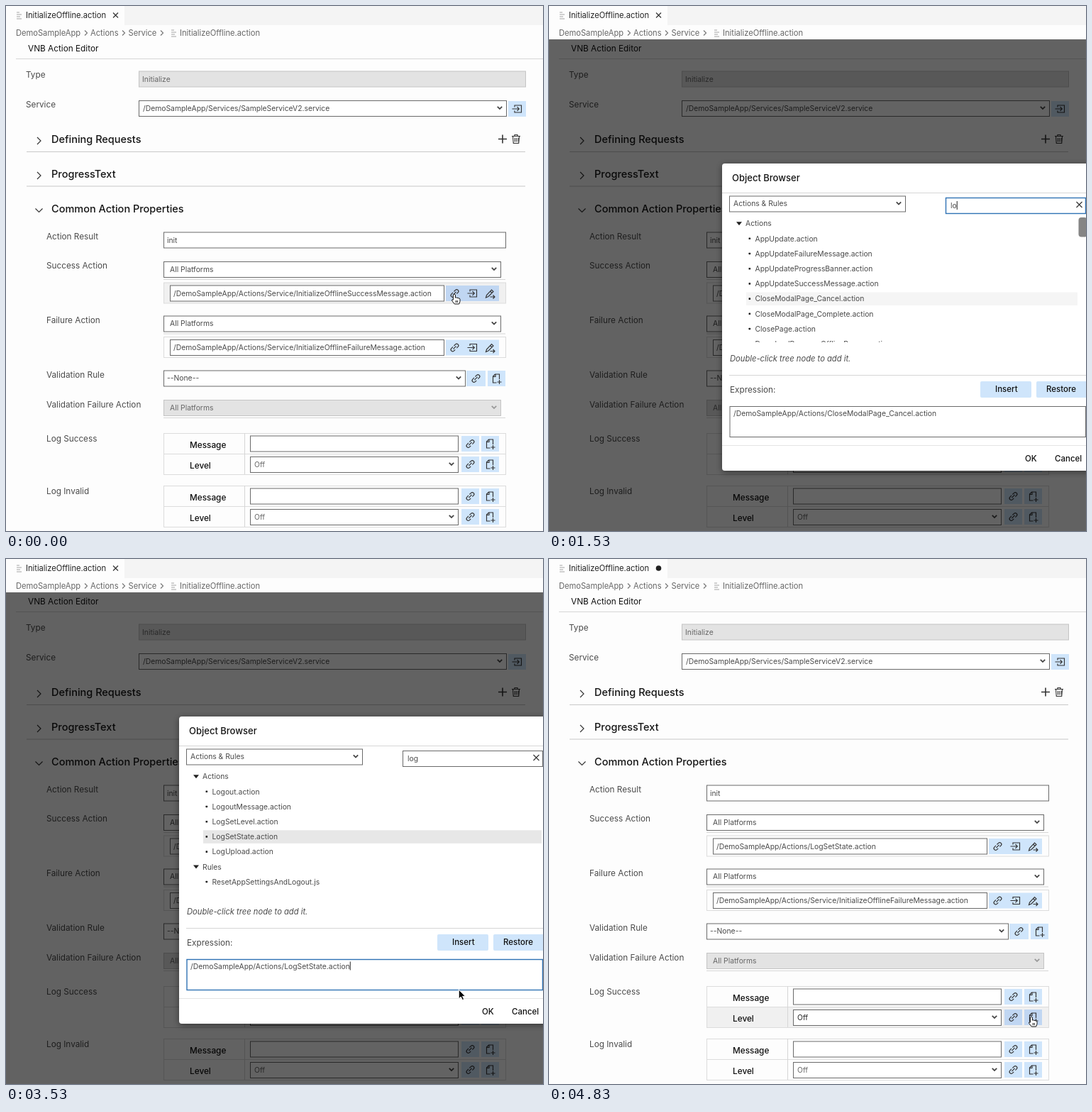
An HTML page that plays this animation: 757 by 740 pixels, repeating every 4.93 s.

```html
<!DOCTYPE html>
<html lang="en">
<head>
<meta charset="utf-8">
<title>Action editor</title>
<style>
html, body { margin: 0; width: 100%; height: 100%; overflow: hidden; background: #fdfdfd; }
svg { display: block; }
text { font: 10.35px Inter, sans-serif; fill: #4a4a4a; white-space: pre; }
.label { font-size: 11.75px; }
.crumb { font-size: 11.15px; fill: #666; }
.tab { font-size: 11.15px; fill: #222; }
.title { font-size: 11.8px; fill: #111; }
.head { font-size: 14.5px; font-weight: 500; fill: #151515; }
.strong { font-size: 11.8px; font-weight: 500; fill: #111; }
.action { font-size: 11.5px; font-weight: 500; fill: #111; }
.hint { font-size: 11.2px; font-style: italic; }
.value { fill: #666; }
.btn { fill: #cfe5fb; }
.line { fill: none; stroke: #d6d6d6; }
.icon { fill: none; stroke: #333; stroke-width: 1.15; }
.bg { fill: none; stroke: #dcdcdc; }
.box { fill: #fff; stroke: #6a6a6a; }
.off { fill: #e3e3e3; stroke: #c4c4c4; }
.focus .box { stroke: #2f72b4; stroke-width: 1.4; }
.hot .bg { fill: #f0f0f0; }
.hot .btn { fill: #c0d6f2; }
.hot .value { fill: #222; }
</style>
</head>
<body>
<svg id="stage" width="757" height="740" viewBox="0 0 757 740"></svg>
<script>
const LOOP = 4930;
const stage = document.getElementById('stage');
const byId = id => document.getElementById(id);

const text = (x, y, s, cls = '', id = '') => `<text x="${x}" y="${y}" class="${cls}" id="${id}">${s}</text>`;
const rect = (x, y, w, h, cls, extra = '') =>
  `<rect x="${x}" y="${y}" width="${w}" height="${h}" class="${cls}" ${extra}/>`;
const path = (d, cls = 'icon', extra = '') => `<path d="${d}" class="${cls}" ${extra}/>`;
const hline = (x1, x2, y, color = '#d6d6d6') => path(`M${x1} ${y}H${x2}`, 'line', `style="stroke:${color}"`);
const at = (x, y, s) => `<g transform="translate(${x} ${y})">${s}</g>`;

const icons = {
  link: `<g transform="rotate(-45)">${path('M1-2.5H4A2.5 2.5 0 0 1 4 2.5H1.5M-1-2.5H-4A2.5 2.5 0 0 0-4 2.5H-1.5M-3 0H3')}</g>`,
  enter: path('M-3.5-2.5V-5H6V5H-3.5V2.5M-7 0H2.5M0-2.8L2.8 0 0 2.8'),
  edit: path('M-6 6L-5 2.5 2-5 4.5-2.5-2.5 4.5ZM0-3L2.5-.5M0 5H6M4 2.5L6.5 5 4 7.5'),
  file: path('M0 6H-5V-3L-2-6H4V1M-5-2.5H-1.5V-6M4 2V8M1 5H7')
};
const button = (icon, x, y, w = 25, h = 22) =>
  rect(x, y, w, h, 'btn') + at(x + w / 2, y + h / 2, icons[icon]);
const caret = (x, y, color = '#444') =>
  path(`M${x - 3.2} ${y - 1.6}l3.2 3.2 3.2-3.2`, 'icon', `style="stroke:${color};stroke-width:1.8"`);
const field = (x, y, w, s = '', cls = 'box') =>
  rect(x + .5, y + .5, w, 22, cls) + text(x + 5, y + 15, s, cls === 'off' ? 'value' : '');
const select = (x, y, w, s, pad = 5, cls = 'box', textCls = '') =>
  rect(x + .5, y + .5, w, 22, cls) + text(x + pad, y + 14.8, s, textCls) +
  caret(x + w - 9, y + 10.5, cls === 'off' ? '#999' : '#444');

const section = (y, title, open) =>
  path(open ? `M41.5 ${y - 5}l5 5 5-5` : `M44 ${y - 8}l5 5-5 5`) + text(64, y, title, 'head');

function linkedAction(y, label, value, id) {
  return text(57, y + 10, label, 'label') + select(222, y, 475, 'All Platforms', 9) +
    hline(222, 704, y + 25.5) +
    `<g id="${id}Row">` + rect(222.5, y + 30, 482, 29, 'bg') + field(231, y + 33.5, 386) +
    text(236, y + 48.5, value, '', id) + button('link', 620, y + 34) +
    button('enter', 645, y + 34) + button('edit', 670, y + 34) + '</g>';
}

function logTable(y, label, id) {
  const tools = top => button('link', 642, top) + button('file', 670, top);
  return text(57, y + 12, label, 'label') +
    rect(222.5, y + .5, 482, 29, 'bg') + text(259, y + 21, 'Message', 'strong') +
    field(344, y + 3.5, 293) + tools(y + 4) +
    `<g id="${id}">` + rect(222.5, y + 29.5, 482, 29, 'bg') + text(259, y + 50, 'Level', 'strong') +
    select(344, y + 33, 293, 'Off', 6, 'box', 'value') + tools(y + 33) + '</g>' +
    path(`M336.5 ${y}v58`, 'line');
}

const lines = (x, y) => path(`M${x} ${y - 4}h4m-4 3h7m-7 3h5m-5 3h7`, 'icon', 'style="stroke:#999;stroke-width:.9"');
const chevron = x => path(`M${x} 34.5l3.5 3.5-3.5 3.5`, 'icon', 'style="stroke:#777"');
const cross = (x, y, r) => path(`M${x - r} ${y - r}l${2 * r} ${2 * r}m0-${2 * r}l-${2 * r} ${2 * r}`);

const page =
  rect(0, 0, 757, 740, '', 'fill="#fdfdfd"') + rect(167, 0, 590, 27, '', 'fill="#f4f4f4"') +
  lines(15, 13) + text(28, 17.3, 'InitializeOffline.action', 'tab') +
  `<g id="saved">${cross(154.5, 13, 3.5)}</g><circle id="dirty" cx="154.5" cy="13" r="3.8" fill="#222"/>` +
  text(14, 42, 'DemoSampleApp', 'crumb') + chevron(111) + text(119, 42, 'Actions', 'crumb') + chevron(164) +
  text(172.5, 42, 'Service', 'crumb') + chevron(218) + lines(233, 38) +
  text(245, 42, 'InitializeOffline.action', 'crumb') +
  text(31, 64, 'VNB Action Editor', 'title') + hline(14, 757, 74.5) +
  text(28, 101, 'Type', 'label') + field(187, 91.5, 545, 'Initialize', 'off') +
  text(28, 142.5, 'Service', 'label') +
  select(187, 133, 518, '/DemoSampleApp/Services/SampleServiceV2.service', 6) + button('enter', 708, 134) +
  section(193, 'Defining Requests') + hline(29, 732, 205.5, '#c8c8c8') +
  path('M694 187.5h12m-6-6v12', 'icon', 'style="stroke-width:1.6"') +
  path('M713 183.5h12m-8 0v-2h4v2m-6.500 0l.8 10h7.400l.8-10m-6 2.500v5.500m2.500-5.500v5.500m2.500-5.500v5.500') +
  section(242, 'ProgressText') + hline(29, 732, 254, '#c8c8c8') +
  section(290.5, 'Common Action Properties', true) +
  text(57, 328.5, 'Action Result', 'label') + field(222, 318.5, 482, 'init') +
  linkedAction(360, 'Success Action', '', 'success') +
  linkedAction(436.5, 'Failure Action', '/DemoSampleApp/Actions/Service/InitializeOfflineFailureMessage.action', 'failure') +
  text(57, 523.5, 'Validation Rule', 'label') + select(222, 513.5, 425, '--None--') +
  button('link', 649, 514, 27) + button('file', 679, 514) +
  text(57, 565.5, 'Validation Failure Action', 'label') +
  select(222, 555, 475, 'All Platforms', 9, 'off', 'value') + hline(222, 704, 580.5) +
  logTable(602, 'Log Success', 'level') + logTable(676, 'Log Invalid', 'invalid');

function tree(groups) {
  let y = 310.3;
  return Object.entries(groups).map(([name, items]) => {
    const head = path(`M264 ${y - 6}h8l-4 5z`, '', 'fill="#222"') + text(277, y, name);
    y += 21.2;
    return head + items.map(item => {
      const row = rect(281.5, y - 5, 2.6, 2.6, '', 'rx=".6" fill="#222"') + text(290.5, y, item);
      y += 21.2;
      return row;
    }).join('');
  }).join('');
}

const actions = names => names.split(' ').map(n => n + '.action');
const allItems = tree({ Actions: actions('AppUpdate AppUpdateFailureMessage AppUpdateProgressBanner ' +
  'AppUpdateSuccessMessage CloseModalPage_Cancel CloseModalPage_Complete ClosePage ' +
  'DownloadProgressOfflineBanner') });
const foundItems = tree({
  Actions: actions('Logout LogoutMessage LogSetLevel LogSetState LogUpload'),
  Rules: ['ResetAppSettingsAndLogout.js']
});

const dialog =
  rect(244, 222, 530, 433, '', 'rx="4" fill="#fff" filter="url(#shadow)"') +
  text(258, 246.5, 'Object Browser', 'head', 'dialogTitle') + hline(244, 757, 263.5) +
  select(254, 267.5, 248, 'Actions &amp; Rules', 6) +
  `<g id="search">${rect(559.5, 270.5, 197, 22, 'box')}</g>` + text(566, 285.2, '', '', 'query') +
  `<g id="lens"><circle cx="745.500" cy="278.500" r="4.500" class="icon"/>${path('M749 282l4.500 4.500', 'icon', 'style="stroke-width:2"')}</g>` +
  `<g id="clear">${cross(747.5, 280, 4)}</g>` +
  '<g clip-path="url(#treeArea)"><rect id="mark" x="278" height="18.500"/><g id="all">' + allItems +
  rect(746.5, 298, 12, 27.5, '', 'rx="4" fill="#858585"') + `</g><g id="found">${foundItems}</g></g>` +
  text(255, 500.5, 'Double-click tree node to add it.', 'hint') + hline(254, 757, 520.5) +
  text(255, 545, 'Expression:', 'label') +
  rect(608, 529, 72, 23, 'btn', 'rx="2"') + text(629, 544.3, 'Insert', 'action') +
  rect(687, 529, 76, 23, 'btn', 'rx="2"') + text(701, 544.3, 'Restore', 'action') +
  `<g id="area">${rect(255, 564.5, 501.5, 43, 'box')}</g>` + text(260, 577.5, '', '', 'expression') +
  '<rect id="bar" width="1" height="12" fill="#222"/>' + hline(244, 757, 619.5, '#e4e4e4') +
  rect(663.5, 627.5, 33, 22, '', 'id="okFocus" fill="#bcd7f4" stroke="#2469b0" stroke-width="1.6"') +
  text(671, 642.3, 'OK', 'action', 'ok') + text(713, 642.3, 'Cancel', 'action');

stage.innerHTML =
  '<defs><clipPath id="treeArea"><rect x="245" y="296" width="512" height="178"/></clipPath>' +
  '<filter id="shadow"><feDropShadow dx="0" dy="2" stdDeviation="5" flood-opacity=".45"/></filter></defs>' +
  page + rect(0, 47, 757, 693, '', 'id="dim" opacity=".61"') + `<g id="dialog">${dialog}</g>` +
  '<g id="cursor">' +
  path('M0 0V13L3 10.200 5.200 14.600 7.400 13.600 5.300 9.400H9.300Z', '', 'id="arrow" stroke="#fff"') +
  path('M-1.600 1Q0-1 1.400 1V5.200Q2.500 4.300 3.800 5.400 5.200 4.800 6 6 7.800 5.600 8 7.400V10.500L6.700 14H.2L-3.400 9.400Q-4.200 7.600-1.600 8.200ZM2.300 9v3M4.300 9v3',
    '', 'id="hand" fill="#fff" stroke="#111"') + '</g>';
byId('dialogTitle').style.fontSize = '13px';

const show = (id, on) => byId(id).style.display = on ? '' : 'none';
const clamp = v => Math.min(1, Math.max(0, v));

// Pointer stops: time, x, y
const stops = [[0, 632, 406], [30, 632, 406], [100, 578, 328], [230, 578, 328], [600, 640, 280], [1750, 620, 300],
  [2060, 414, 389], [2140, 414, 389], [2230, 417, 408], [2550, 435, 422], [3000, 435, 422],
  [3720, 680, 645], [LOOP, 680, 645]];

function pointer(t) {
  const i = stops.findIndex(s => s[0] > t);
  const [t0, x0, y0] = stops[i - 1], [t1, x1, y1] = stops[i];
  const k = (t - t0) / (t1 - t0), e = k * k * (3 - 2 * k);
  return [x0 + (x1 - x0) * e, y0 + (y1 - y0) * e];
}

function draw(t) {
  const open = t >= 30 && t < 4430, found = t >= 1690, pressed = t >= 3860;
  const searching = t >= 630 && t < 2060, inserted = t >= 2400;
  const editing = t < 630 || (inserted && !pressed);
  const query = 'log'.slice(0, (t >= 1330) + (t >= 1430) + (t >= 1630));
  const chosen = inserted ? 'LogSetState' : 'CloseModalPage_Cancel';

  show('dim', open);
  show('dialog', open);
  byId('dialog').style.opacity = Math.min(clamp((t - 30) / 140), clamp((4430 - t) / 410));
  show('saved', t < 4430);
  show('dirty', t >= 4430);
  byId('success').textContent = '/DemoSampleApp/Actions/' +
    (t < 4000 ? 'Service/InitializeOfflineSuccessMessage' : 'LogSetState') + '.action';
  byId('successRow').classList.toggle('hot', t < 30);
  byId('level').classList.toggle('hot', t >= 4430);

  byId('query').textContent = query || (searching ? '' : 'Search for data field');
  byId('search').classList.toggle('focus', searching);
  show('lens', !query);
  show('clear', query);
  show('all', !found);
  show('found', found);
  const mark = byId('mark');
  show('mark', !found || t >= 2060);
  mark.setAttribute('y', found ? 382.3 : 403.5);
  mark.setAttribute('width', found ? 477 : 467);
  mark.setAttribute('fill', found ? '#e7e7e7' : searching ? '#f5f5f5' : '#dedede');

  byId('expression').textContent = `/DemoSampleApp/Actions/${chosen}.action`;
  byId('area').classList.toggle('focus', editing);
  show('bar', open && (searching || editing));
  if (open) {
    const host = byId(searching ? 'query' : 'expression');
    byId('bar').setAttribute('x', +host.getAttribute('x') + host.getComputedTextLength());
    byId('bar').setAttribute('y', searching ? 275 : 567.5);
  }
  show('okFocus', pressed);
  byId('ok').style.fill = t < 300 ? '#888' : '';

  const overButton = t < 30 || t >= 3660;
  show('cursor', t < 1300 || t >= 1750);
  show('hand', overButton);
  show('arrow', !overButton);
  byId('cursor').setAttribute('transform', `translate(${pointer(t)})`);
}

function tick(now) {
  draw(now % LOOP);
  requestAnimationFrame(tick);
}
draw(0);
requestAnimationFrame(tick);
</script>
</body>
</html>
```
